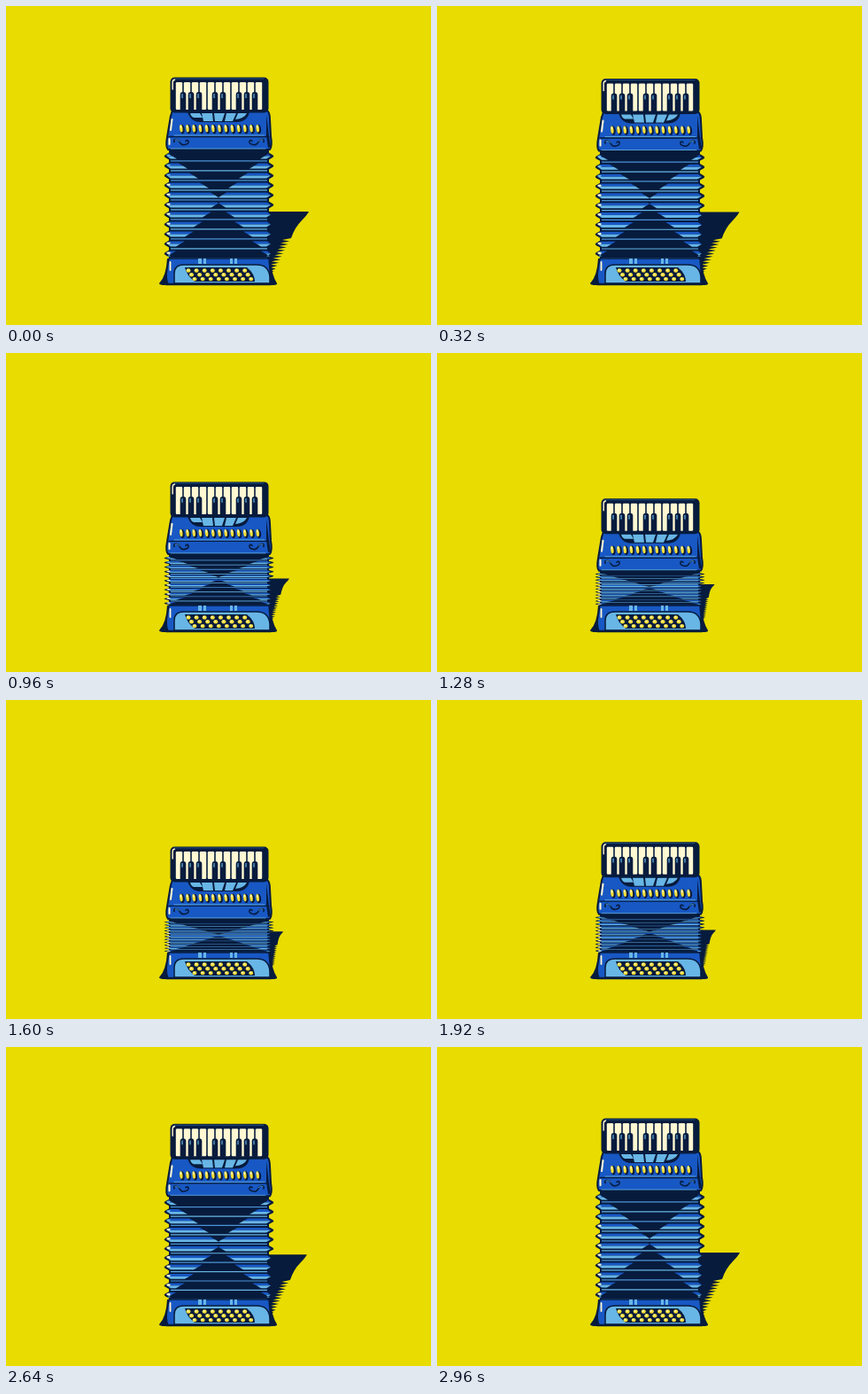
These frames come from a looping animation (480 by 360 pixels, 3040 ms). An HTML page with a canvas:

```html
<!DOCTYPE html>
<html lang="en">
<head>
<meta charset="utf-8">
<title>Accordion</title>
<style>
html, body { margin: 0; width: 100%; height: 100%; overflow: hidden; background: #e8dc00; }
canvas { display: block; width: 480px; height: 360px; }
</style>
</head>
<body>
<canvas id="stage" width="480" height="360"></canvas>
<script>
const c = document.getElementById('stage').getContext('2d');
const YELLOW = '#e8dc00', NAVY = '#071b3d', BLUE = '#1858c4', SKY = '#68b6e6',
      CREAM = '#fff8d2', GOLD = '#f7df3c';
const LOOP = 3040, STEP = 80, TRAVEL = 85, FOLDS = 11;

function shape(path, fill, stroke, width = 1.5) {
  const p = new Path2D(path);
  if (fill) { c.fillStyle = fill; c.fill(p); }
  if (stroke) {
    c.strokeStyle = stroke;
    c.lineWidth = width;
    c.lineJoin = c.lineCap = 'round';
    c.stroke(p);
  }
}

function box(x, y, w, h, fill, r = 0) {
  c.fillStyle = fill;
  c.beginPath();
  c.roundRect(x, y, w, h, r);
  c.fill();
}

function oval(x, y, rx, ry, fill, turn = 0) {
  c.fillStyle = fill;
  c.beginPath();
  c.ellipse(x, y, rx, ry, turn, 0, Math.PI * 2);
  c.fill();
}

// Cubic ease in and out around a given midpoint.
function ease(t, start, mid, end) {
  if (t <= start) return 0;
  if (t >= end) return 1;
  return t < mid ? 0.5 * ((t - start) / (mid - start)) ** 3
                 : 1 - 0.5 * ((end - t) / (end - mid)) ** 3;
}

function drop(t) {
  return TRAVEL * (ease(t, 80, 810, 1490) - ease(t, 1520, 2320, 3000));
}

function shadow(h) {
  const x = 342 - 0.34 * h, y = 232 + 0.345 * h;
  const s = (x - 299) / 43;
  const ex = x - 20 * s, ey = y + 30 * (0.25 + 0.75 * s);
  let d = `M296 ${y}H${x}Q${x - 2 * s} ${y + 4 * s} ${x - 8 * s} ${y + 10 * s}Q${x - 16 * s} ${y + 18 * s} ${ex} ${ey}`;
  const n = 11, gap = (300 - ey) / n;
  for (let i = 0; i < n; i++) {
    const edge = ex + (303 - ex) * i / n, yy = ey + gap * i;
    d += `L${edge} ${yy}L${Math.max(299, edge - 10 * s)} ${yy + gap * 0.6}`;
  }
  shape(d + 'L303 300H296Z', NAVY);
}

function bellows(h) {
  const top = 164 + h, fold = (285 - top) / FOLDS;
  box(184, top - 2, 113, 287 - top, NAVY);
  for (let i = 0; i < FOLDS; i++) {
    const y = top + i * fold, m = y + fold / 2;
    shape(`M185 ${y + fold * 0.1}L180 ${m - fold * 0.14}Q177.5 ${m} 180 ${m + fold * 0.14}L185 ${y + fold * 0.9}H296L301 ${m + fold * 0.14}Q303.5 ${m} 301 ${m - fold * 0.14}L296 ${y + fold * 0.1}Z`, NAVY);
    const r = (i + 0.5) / FOLDS;
    const w = r < 0.44 ? 58 * (1 - r / 0.44) : Math.max(0, 58 * (r - 0.47) / 0.53);
    const slant = r < 0.44 ? -5 : 5;
    const a = 240 - w, b = 240 + w, y1 = y + fold * 0.22, y2 = y + fold * 0.5, y3 = y + fold * 0.77;
    if (w < 56) {
      shape(`M185 ${y1}H${a + slant}L${a} ${y2}H182ZM295 ${y1}H${b - slant}L${b} ${y2}H299Z`, BLUE);
      shape(`M182 ${y2}H${a}L${a - slant} ${y3}H186ZM299 ${y2}H${b}L${b + slant} ${y3}H294Z`, SKY);
    }
    box(186, y + fold * 0.93, 109, Math.min(1.2, fold * 0.25), i % 2 ? SKY : '#4c93d5');
    oval(183.5, m - fold * 0.08, 2.2, Math.min(1.2, fold * 0.16), i > 2 ? CREAM : SKY);
  }
}

function swirl(x, flip) {
  c.save();
  c.translate(x, 153.5);
  c.scale(flip, 1);
  shape('M-8 0Q-9-3-6-3Q-3-3-2 0Q0 4 4 3Q9 2 8-1Q7-3 5-1', null, NAVY, 1.6);
  shape('M-7-2.5Q-4-4-2-1', null, SKY, 0.7);
  c.restore();
}

function head(h) {
  c.save();
  c.translate(0, h);
  // Body and lower rim
  shape('M188 118H295Q298 120 298 128L299 147Q301 158 298 162H183Q180 159 182 148L186 124Z', BLUE, NAVY, 2);
  shape('M294 122L297 147L299 159L296 160L294 146Z', NAVY);
  shape('M184 147.5H297', null, NAVY, 1.3);
  shape('M190 146H292M186 161H293', null, SKY, 0.8);
  shape('M187.5 128L186 140M184.5 150V156', null, CREAM, 2);
  // Grille
  shape('M205 119H275Q273 131 260 131H220Q208 131 205 119Z', NAVY);
  shape('M208 121H219L222 126H212Q209 125 208 121ZM221 121H233L234 130H223ZM235 121H247L244 130H236ZM249 121H260L256 130H247ZM262 121H272Q269 127 259 128Z', SKY);
  // Keyboard
  box(185.5, 80.5, 111, 40, NAVY, 5);
  shape('M190 82H291', null, '#2d659f', 0.7);
  shape('M188.2 94V86Q188.2 83.5 190.5 83.2', null, CREAM, 1.4);
  for (let i = 0; i < 11; i++) box(191.8 + i * 9, 86, 7.4, 31, CREAM, 1.2);
  for (let i = 1; i < 11; i++) {
    if (i === 4 || i === 7) continue;
    const x = 191 + i * 9;
    box(x - 3.3, 97, 6.6, 20.5, NAVY, [3, 3, 0, 0]);
    box(x - 1.6, 99, 1.2, 5, SKY, 0.6);
  }
  // Register switches
  for (let i = 0; i < 13; i++) {
    const x = 198 + i * 7.2;
    oval(x + 1, 139, 2.7, 5.2, NAVY, -0.12);
    oval(x - 0.2, 138.2, 1.7, 4.2, GOLD, -0.12);
    oval(x - 0.5, 136.2, 0.7, 1.5, CREAM);
  }
  swirl(198, 1);
  swirl(283, -1);
  c.restore();
}

function base() {
  shape('M182 285Q181 305 173 313Q173 315 180 315H300Q307 315 306 313Q300 304 299 285Z', NAVY);
  shape('M184 285H297Q299 300 298 314H183Q180 308 182 296Z', BLUE, NAVY, 1.5);
  shape('M217 285H221V291H217ZM223 285H226V291H223ZM253 285H256V291H253ZM258 285H261V291H258Z', SKY);
  shape('M190 313V302Q190 292 201 292H283Q297 292 298 306V313Z', SKY, NAVY, 1.5);
  shape('M202 295H272Q281 302 281 311H213Q204 304 202 295Z', NAVY);
  for (let row = 0; row < 3; row++)
    for (let i = 0; i < 8; i++) {
      const x = 206 + row * 3.5 + i * 9.1, y = 298.5 + row * 4.8;
      oval(x, y, 2.5, 2.2, GOLD);
      oval(x - 0.6, y - 0.6, 0.9, 0.8, CREAM);
    }
  shape('M185.5 289V298', null, CREAM, 1.8);
  shape('M181 314H299', null, NAVY, 2.5);
}

function draw(now) {
  const t = Math.floor((now % LOOP) / STEP) * STEP, h = drop(t);
  c.fillStyle = YELLOW;
  c.fillRect(0, 0, 480, 360);
  shadow(h);
  bellows(h);
  base();
  head(h);
}

let begin;
function tick(now) {
  begin ??= now;
  draw(now - begin);
  requestAnimationFrame(tick);
}
draw(0);
requestAnimationFrame(tick);
</script>
</body>
</html>
```
